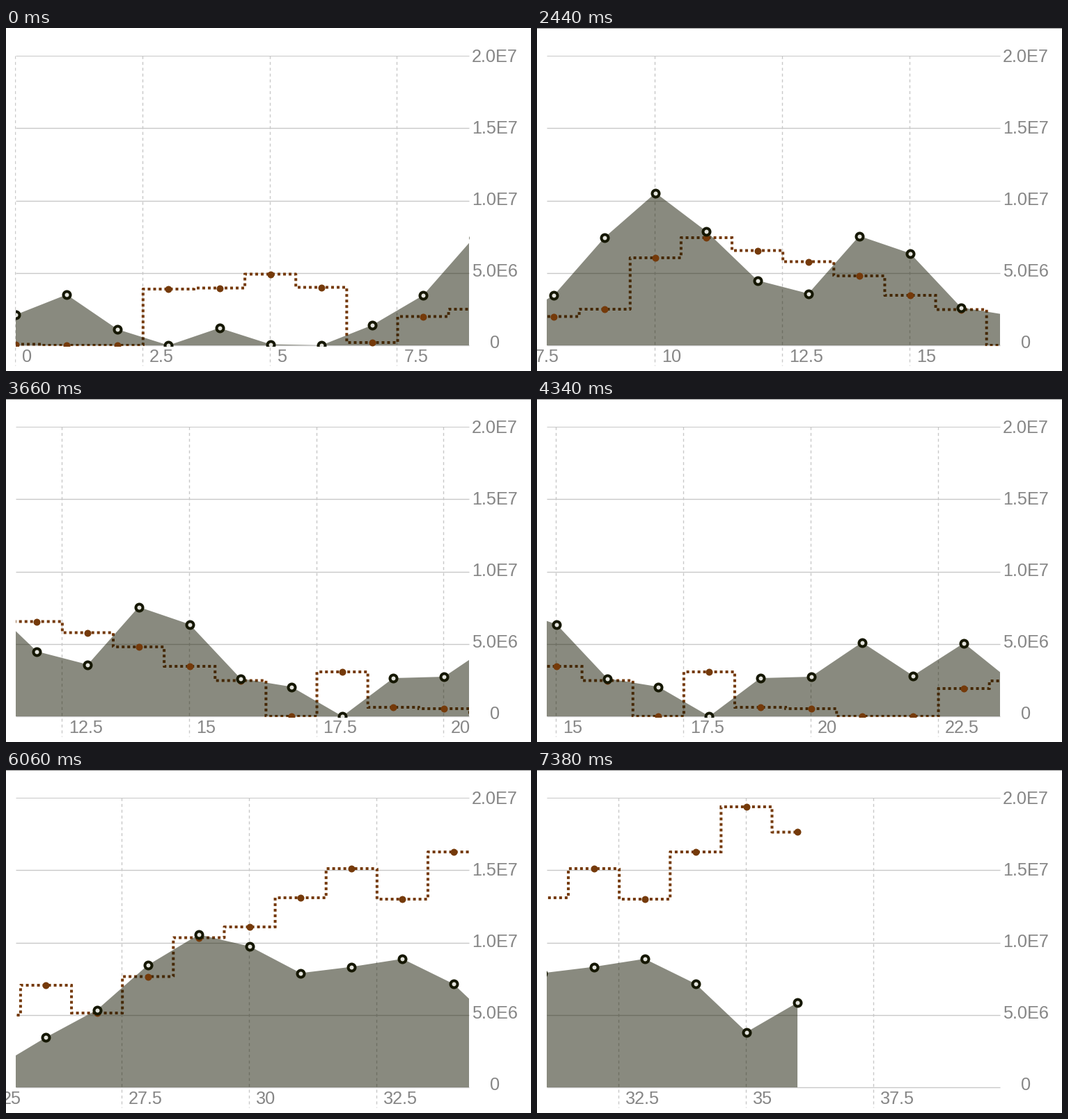
Recreate the animation shown at these times as a matplotlib script. Size 754 px wide and 494 px high, loop 7.9 s.

```python
import matplotlib.pyplot as plt
import numpy as np
from matplotlib.animation import FuncAnimation
from matplotlib.patches import Rectangle

W, H, DPI = 754, 494, 100
LOOP, STEP = 7900, 20
PT = 72 / DPI                      # points per pixel
LEFT, RIGHT, TOP, BASE = 14, 664.5, 40, 457
UNIT = 73.13                       # pixels per x unit
MAX_SCROLL = 40 * UNIT - (RIGHT - LEFT)
DECAY = 500

OLIVE, BROWN, GRID, LABEL = "#151700", "#753a0a", "#c8c8c8", "#868686"

# Start (ms), drag time (ms) and release speed (px/ms) of each swipe
SWIPES = [(1620, 478.4, 1.18136), (4060, 273, 1.50786), (5940, 123.5, 0.8393)]

# Heights above the baseline in pixels, one per x unit
area_h = np.array([
    44, 73, 23, 0, 25, 1.5, 0, 29, 72, 155.5, 219.5, 164, 93.5, 74.5, 157.5,
    132.5, 54.5, 42.5, 0, 55, 57, 106.5, 58.5, 105.5, 46.5, 28, 72, 111.5,
    176, 220, 203, 164.5, 173.5, 185, 149, 79.5, 122])
step_h = np.array([
    1.5, 0, 0, 81, 82.5, 102.5, 83.5, 4, 41.5, 52, 126, 155, 136.5, 120.5,
    100, 72, 51.5, 0, 64, 13, 11, 0, 0, 40, 51, 104, 147, 107, 159.5, 215.5,
    231, 273, 315, 271, 339, 404, 367.5])

xs = LEFT + UNIT * np.arange(len(area_h))
area_y, step_y = BASE - area_h, BASE - step_h


def swipe(t, start, drag, speed):
    """Distance of a finger drag that speeds up, then coasts to rest."""
    t = max(t - start, 0)
    if t < drag:
        return speed * t * t / (2 * drag)
    return speed * (drag / 2 + DECAY * (1 - np.exp(-(t - drag) / DECAY)))


def scroll_at(t):
    return min(sum(swipe(t, *s) for s in SWIPES), MAX_SCROLL)


def dotted_steps(on=4.3, period=8):
    """Centred step line, cut into dashes measured along its length."""
    mids = (xs[:-1] + xs[1:]) / 2
    px = np.concatenate([xs[:1], np.repeat(mids, 2), xs[-1:]])
    py = np.repeat(step_y, 2)
    length = np.concatenate(
        [[0], np.cumsum(np.hypot(np.diff(px), np.diff(py)))])
    s = np.arange(0, length[-1], 0.5)
    y = np.interp(s, length, py)
    y[s % period > on] = np.nan
    return np.interp(s, length, px), y


plt.rcParams["path.simplify"] = False
plt.rcParams["font.family"] = "Liberation Sans"
fig = plt.figure(figsize=(W / DPI, H / DPI), dpi=DPI, facecolor="white")
ax = fig.add_axes([0, 0, 1, 1])
ax.set(xlim=(0, W), ylim=(H, 0))
ax.axis("off")


def clip(x0, y0, x1, y1):
    return Rectangle((x0, y0), x1 - x0, y1 - y0, transform=ax.transData)


plot_clip = clip(LEFT, TOP, RIGHT, BASE + 0.5)
axis_clip = clip(13, TOP, 665, H)


def line(x, y, color, width, box=None, **kw):
    artist, = ax.plot(x, y, color=color, lw=width * PT, **kw)
    if box is not None:
        artist.set_clip_path(box)
    return artist


def label(x, y, text, **kw):
    return ax.text(x, y, text, color=LABEL, size=25.2 * PT, va="baseline", **kw)


for k, name in enumerate(["2.0E7", "1.5E7", "1.0E7", "5.0E6", "0"]):
    y = 40.5 + 104 * k
    line([LEFT, RIGHT], [y, y], GRID, 1 if k == 0 else 1.4, zorder=1,
         solid_capstyle="butt")
    label(702, 49.3 + 102.8 * k, name, ha="center")

ticks = []
for value in np.arange(0, 40.1, 2.5):
    rule = line([0, 0], [TOP, 486], GRID, 1.4, axis_clip, zorder=1,
                dashes=(3, 3), dash_capstyle="butt")
    text = label(0, 481, f"{value:g}", ha="left")
    text.set_clip_path(axis_clip)
    ticks.append((LEFT - 1 + value * UNIT, rule, text))

dot_x, dot_y = dotted_steps()
dots = line([], [], BROWN, 4, plot_clip, zorder=2, solid_capstyle="butt",
            solid_joinstyle="miter", snap=False)

area_xy = np.column_stack([np.concatenate([xs[:1], xs, xs[-1:]]),
                           np.concatenate([[BASE], area_y, [BASE]])])
area, = ax.fill(*area_xy.T, color=OLIVE, alpha=0.5, lw=0, zorder=3)
area.set_clip_path(plot_clip)

step_points = line([], [], BROWN, 0, plot_clip, zorder=4, ls="none",
                   marker="o", ms=10 * PT, mew=0, snap=False)
area_points = line([], [], OLIVE, 0, plot_clip, zorder=5, ls="none",
                   marker="o", ms=10 * PT, mew=4 * PT, mfc="#e4e4df",
                   snap=False)
border = line([0, W - 0.5, W - 0.5], [0.5, 0.5, H], "#999999", 1, zorder=6)


def draw(i):
    t = i * STEP
    shift = scroll_at(t)

    x = dot_x - shift
    seen = (x > LEFT - 10) & (x < RIGHT + 10)
    dots.set_data(x[seen], dot_y[seen])
    area.set_xy(area_xy - [shift, 0])

    x = xs - shift
    seen = (x > LEFT - 10) & (x < RIGHT + 10)
    step_points.set_data(x[seen], step_y[seen])
    area_points.set_data(x[seen], area_y[seen])

    for home, rule, text in ticks:
        x = home - shift
        rule.set_xdata([x, x])
        text.set_x(x + 10)
        rule.set_visible(10 < x < 668)
        text.set_visible(-60 < x < 660)

    border.set_alpha(float(np.clip((t - 20) / 320, 0, 1)))


anim = FuncAnimation(fig, draw, frames=LOOP // STEP, interval=STEP,
                     init_func=lambda: draw(0), repeat=True, repeat_delay=0)
plt.show()
```
